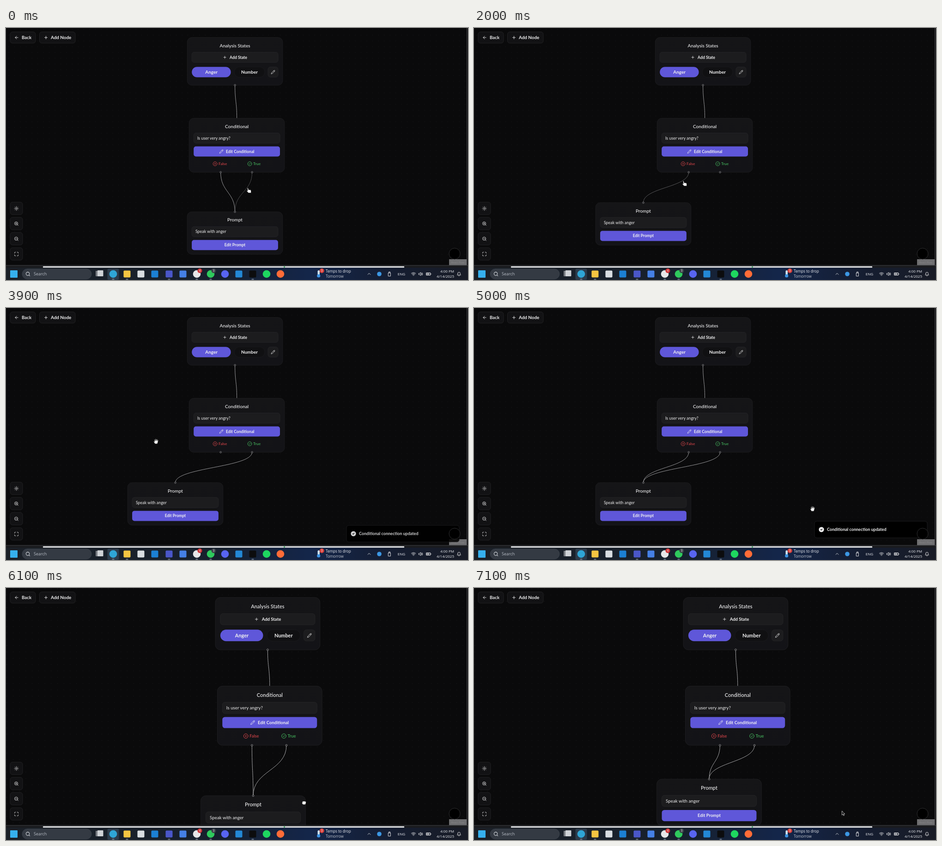
Write an HTML page that moves like this. It is 1000 px wide and 546 px high and loops after 7.2 s.

```html
<!DOCTYPE html>
<html lang="en">
<head>
<meta charset="utf-8">
<title>Flow editor</title>
<style>
  html, body { margin: 0; width: 100%; height: 100%; overflow: hidden; background: #0a0a0b; }
  svg { display: block; width: 100%; height: 100%; }
  text { font-family: Lato, sans-serif; fill: #f1f1f2; white-space: pre; }
  .b { font-weight: 700; }
  .m { font-weight: 500; }
  .mid { text-anchor: middle; }
  .os text { font-family: "Open Sans", "Noto Sans", sans-serif; fill: #eceef2; }
  .icon { fill: none; stroke-linecap: round; stroke-linejoin: round; }
  .edge { fill: none; stroke: #a9a9ab; stroke-width: .9; }
  .card { fill: url(#cardFill); stroke: #202023; stroke-width: .8; }
  .field { fill: #1c1c1e; stroke: #29292b; stroke-width: .7; }
  .btn { fill: #121214; stroke: #272729; stroke-width: .8; }
  .main { fill: #5f57d9; }
  .port { fill: #111113; stroke: #a0a0a2; stroke-width: .8; }
  .hand { fill: #fff; stroke: #111; stroke-width: .7; stroke-linejoin: round; }
</style>
</head>
<body>
<svg id="stage" viewBox="0 0 1000 546" preserveAspectRatio="none"></svg>
<script>
const LOOP = 7200, STEP = 100, ZOOM_AT = 5300;
const VIEW = { k: 1.097, x: 22.7, y: -2 };

const rect = (x, y, w, h, r, cls, extra = '') =>
  `<rect x="${x}" y="${y}" width="${w}" height="${h}" rx="${r}" class="${cls}" ${extra}/>`;
const fillRect = (x, y, w, h, r, color) => rect(x, y, w, h, r, '', `fill="${color}"`);
const dot = (x, y, r, color) => `<circle cx="${x}" cy="${y}" r="${r}" fill="${color}"/>`;
const port = (x, y) => `<circle class="port" cx="${x}" cy="${y}" r="1.7"/>`;
const text = (x, y, size, str, cls = '', extra = '') =>
  `<text x="${x}" y="${y}" dy=".35em" font-size="${size}" class="${cls}" ${extra}>${str}</text>`;

const ICONS = {
  back: 'M19 12H5M12 19l-7-7 7-7',
  plus: 'M5 12h14M12 5v14',
  pencil: 'M21 7a2.8 2.8 0 0 0-4-4L4 16l-2 6 6-2zM15 5l4 4',
  sun: 'M16 12a4 4 0 1 1-8 0a4 4 0 1 1 8 0M12 2v2M12 20v2M5 5l1.4 1.4M17.6 17.6L19 19M2 12h2M20 12h2M6.4 17.6L5 19M19 5l-1.4 1.4',
  lens: 'M19 11a8 8 0 1 1-16 0a8 8 0 1 1 16 0M21 21l-4.3-4.3',
  full: 'M8 3H5a2 2 0 0 0-2 2v3M21 8V5a2 2 0 0 0-2-2h-3M3 16v3a2 2 0 0 0 2 2h3M16 21h3a2 2 0 0 0 2-2v-3',
  ring: 'M22 12a10 10 0 1 1-20 0a10 10 0 1 1 20 0',
  cross: 'M15 9l-6 6M9 9l6 6',
  check: 'M8 12l3 3 5-6',
  up: 'M5 15l7-7 7 7',
  wifi: 'M2 9a15 15 0 0 1 20 0M5 13a10 10 0 0 1 14 0M8.5 16.5a5 5 0 0 1 7 0M12 20h.1',
  sound: 'M11 5L6 9H2v6h4l5 4zM15 9a5 5 0 0 1 0 6M18 6a9 9 0 0 1 0 12',
  battery: 'M2 7h17v10H2zM22 11v2M5 10h8v4H5z',
  bell: 'M6 9a6 6 0 0 1 12 0c0 6 3 8 3 8H3s3-2 3-8M10 21h4',
  device: 'M7 7h10v15H7zM9 7V2h6v5'
};
ICONS.zoomIn = ICONS.lens + 'M11 8v6M8 11h6';
ICONS.zoomOut = ICONS.lens + 'M8 11h6';

const icon = (name, x, y, size = 10, color = '#f1f1f2', weight = 2) =>
  `<path class="icon" d="${ICONS[name]}" stroke="${color}" stroke-width="${weight}"
    transform="translate(${x - size / 2} ${y - size / 2}) scale(${size / 24})"/>`;

// Cards are drawn around their top centre.
const card = (id, x, y, h, title, body) =>
  `<g id="${id}" transform="translate(${x} ${y})">${rect(-103.3, 0, 206.6, h, 10, 'card')}
    ${text(0, 17.6, 10.1, title, 'm mid')}${body}</g>`;
const row = (y, cls) => rect(-93.4, y, 186.8, 22, 5, cls);

const states = card('states', 495.6, 20.5, 103.5, 'Analysis States',
  row(32, 'field') + icon('plus', -22, 43, 9) + text(-11.6, 43, 8.7, 'Add State', 'b') +
  rect(-93.4, 63.7, 84.4, 22.6, 11.3, 'main') + text(-51, 75.2, 9.9, 'Anger', 'b mid') +
  rect(-1.5, 63.7, 66, 22.6, 11.3, '', 'fill="#101012" stroke="#1c1c1f" stroke-width=".8"') +
  text(31.3, 75.2, 9.9, 'Number', 'b mid') +
  rect(71.4, 64, 22, 22, 5, 'field') + icon('pencil', 82.4, 75, 9.5) + port(0, 103.3));

const conditional = card('conditional', 499.6, 195.5, 117, 'Conditional',
  row(32, 'field') + text(-85.6, 43, 8.9, 'Is user very angry?') +
  row(61, 'main') + icon('pencil', -33.5, 72, 9.5) + text(-23.6, 72, 8.6, 'Edit Conditional', 'b') +
  icon('ring', -47, 98.7, 10.5, '#e5484d') + icon('cross', -47, 98.7, 10.5, '#e5484d') +
  text(-39.6, 98.7, 8.4, 'False', '', 'style="fill:#e5484d"') +
  icon('ring', 28, 98.7, 10.5, '#4ac764') + icon('check', 28, 98.7, 10.5, '#4ac764') +
  text(35.4, 98.7, 8.4, 'True', '', 'style="fill:#4ac764"') +
  port(-35, 117) + port(33, 117));

const prompt = card('prompt', 495.5, 398.3, 92, 'Prompt',
  row(32, 'field') + text(-85.6, 43, 8.9, 'Speak with anger') +
  row(61, 'main') + text(0, 72, 8.6, 'Edit Prompt', 'b mid') + port(0, 0));

const edge = id => `<path id="${id}" class="edge"/>`;

const tools = ['sun', 'zoomIn', 'zoomOut', 'full'].map((name, i) =>
  rect(9, 377.3 + i * 32.9, 27, 27, 5, 'btn') + icon(name, 22.5, 391 + i * 32.9, 10.5)).join('');

const header = rect(9, 8.5, 55, 24.3, 5, 'btn') + icon('back', 23, 20.7, 10.5) +
  text(34, 20.7, 9.7, 'Back', 'b') +
  rect(72.5, 8.5, 77.5, 24.3, 5, 'btn') + icon('plus', 86.5, 20.7, 10.5) +
  text(97, 20.7, 9.9, 'Add Node', 'b');

const toast = `<g id="toast">${rect(737, 462, 244, 36, 5, '', 'fill="#000" stroke="#232325" stroke-width=".8"')}
  ${dot(752, 480, 5.6, '#f4f4f5')}${icon('check', 752, 480, 10.5, '#000', 2.6)}
  ${text(764, 480, 9, 'Conditional connection updated', 'b')}</g>`;

// Taskbar apps: x, shape, colour
const APPS = [
  [232, 'o', '#2fa5d5'], [262, 's', '#f5c542'], [292, 's', '#d9dde2'], [322, 's', '#1c80d4'],
  [353, 's', '#4a57c9'], [383, 's', '#4580e6'], [413, 'o', '#e6e6e8'], [443, 'o', '#2fca5d'],
  [474, 'o', '#5865f2'], [504, 's', '#2388d6'], [534, 's', '#0c0c0d'], [564, 'o', '#1ed760'],
  [594, 'o', '#ff6c37']
];
const apps = APPS.map(([x, shape, color]) => shape === 'o'
  ? dot(x, 533, 8.3, color) : fillRect(x - 7.5, 525.5, 15, 15, 2, color)).join('');
const marks = [232, 262, 353, 413, 443, 534].map(x => fillRect(x - 2.5, 543.8, 5, 1.3, .6, '#9aa4b2')).join('');
const badge = (x, color, n) => dot(x, 526, 5, color) + text(x, 526, 6.6, n, 'mid');

const taskbar = `<g class="os">
  ${fillRect(0, 514, 1000, 6, 0, '#1a1b1e')}${fillRect(0, 513.7, 1000, 1.5, 0, '#343538')}
  ${fillRect(80, 516.3, 782, 3.2, 1, '#e9eaec')}${dot(602.5, 517.6, 1.5, '#3fae63')}
  ${fillRect(0, 519.4, 1000, 26.6, 0, 'url(#barFill)')}
  ${fillRect(9, 525, 16, 16, 1, '#35b0ee')}
  ${rect(35, 522, 150, 22, 11, '', 'fill="#343a43" stroke="#434a54" stroke-width=".6"')}
  ${icon('lens', 47.5, 533, 11, '#dfe3e8', 2.2)}${text(60, 533, 9, 'Search', '', 'style="fill:#b9bec6"')}
  ${fillRect(194, 526, 12, 12, 1, '#777b81')}${fillRect(198, 525, 12.5, 13, 1, '#cfd2d6')}
  ${fillRect(219.5, 521.5, 25, 24, 3, '#2c3b4b')}${apps}${marks}
  ${badge(419.5, '#d13438', '4')}${badge(449.5, '#3b4148', '3')}
  ${rect(674.5, 525, 4.5, 11, 2.2, '', 'fill="#cfe3f5"')}${dot(676.7, 537, 3.6, '#3d95e6')}
  ${badge(683.7, '#d9403a', '3')}
  ${text(692, 527.2, 8.1, 'Temps to drop')}${text(692, 538.2, 8.1, 'Tomorrow', '', 'style="fill:#c3c8d0"')}
  ${icon('up', 786, 533, 10)}${dot(808, 533, 4.8, '#3c97e4')}${icon('device', 830, 533, 11)}
  ${text(856, 533, 8, 'ENG', 'mid')}${icon('wifi', 882, 533, 11)}${icon('sound', 898, 533, 11)}
  ${icon('battery', 915, 533, 12)}
  ${text(970, 527, 8, '4:00 PM', '', 'text-anchor="end"')}${text(970, 538, 8, '4/14/2025', '', 'text-anchor="end"')}
  ${icon('bell', 980.5, 533, 10.5)}</g>`;

// Cursor shapes around their visual centre
const HANDS = {
  point: 'M-2.6-5.2q1.3-.8 1.8.6l1 3.2 3-.1q2 .1 2.2 2l.2 4.8h-6l-3.4-4q-.6-1.4.8-1.2l1.2.6z',
  open: 'M-2.6 5.2l-2.7-4.6q0-1.3 1.5-.6l.8.8-1-4.2q.5-1.2 1.5-.2l.9 2.4-.3-3.6q.8-1.3 1.7 0l.4 3.4.7-3q1-1 1.6.2l-.2 3.3.9-2q1.1-.7 1.3.5l-.8 4.4-1.2 3.2z',
  fist: 'M-2.4 4.2l-2-3q-.3-1.5 1-1.4l-.1-2q.8-1.3 2-.5 1-1.1 2.1-.1 1.2-.8 2 .3 1.6-.3 1.7 1l-.2 3-1.2 2.7z',
  arrow: 'M-2.6-5v9l2.1-1.9 1.5 3.2 1.4-.7-1.5-3h2.8z'
};

document.getElementById('stage').innerHTML = `
  <defs>
    <linearGradient id="cardFill" x2="0" y2="1"><stop stop-color="#151517"/><stop offset="1" stop-color="#131317"/></linearGradient>
    <linearGradient id="barFill"><stop stop-color="#1b2027"/><stop offset=".45" stop-color="#17202d"/>
      <stop offset=".66" stop-color="#14264a"/><stop offset=".85" stop-color="#151d30"/><stop offset="1" stop-color="#191c26"/></linearGradient>
    <pattern id="grid" width="12.5" height="12.5" patternUnits="userSpaceOnUse">${dot(6, 3, .5, '#222225')}</pattern>
  </defs>
  ${fillRect(0, 0, 1000, 546, 0, '#0a0a0b')}
  <g id="flow">${fillRect(-40, -20, 1060, 560, 0, 'url(#grid)')}
    ${edge('link')}${edge('no')}${edge('yes')}${edge('draft')}${states}${conditional}${prompt}</g>
  ${fillRect(959, 501, 38, 13, 0, '#6f6f71')}${text(978, 507.5, 6, 'React Flow', 'mid', 'style="fill:#858587"')}
  ${header}${tools}${toast}
  <circle cx="971" cy="489" r="12" fill="#000" stroke="#2e2e30"/>
  ${fillRect(997, 0, 1.6, 514, 0, '#38383b')}${taskbar}
  <path id="cursor" class="hand"/>`;

const el = Object.fromEntries(['flow', 'link', 'no', 'yes', 'draft', 'prompt', 'toast', 'cursor']
  .map(id => [id, document.getElementById(id)]));

// Keys: time, x, y and, for the cursor, its shape from then on
const CURSOR = [
  [0, 525, 352, 'point'], [300, 525, 352, 'open'], [700, 455, 415, 'fist'], [1400, 326, 395, 'open'],
  [1900, 452, 338, 'point'], [2000, 455, 337, 'point'], [2300, 455, 337, 'open'], [2900, 532, 316, 'point'],
  [3000, 532, 316, 'open'], [3200, 492, 341, 'open'], [3600, 368, 383, 'open'], [3700, 368, 383, 'open'],
  [3900, 325, 289, 'open'], [4100, 465, 316, 'open'], [4300, 368, 383, 'open'], [4600, 368, 383, 'open'],
  [5000, 733, 435, 'open'], [5200, 23, 492, 'point'], [5300, 23, 492, 'open'], [5600, 535, 428, 'fist'],
  [6100, 645, 465, 'fist'], [6600, 619, 429, 'open'], [6800, 619, 429, 'arrow'], [7100, 799, 488, 'arrow']
];
const PROMPT = [
  [0, 495.5, 398.3], [700, 495.5, 398.3], [1400, 366.5, 378.4], [5600, 366.5, 378.4],
  [6100, 467, 412], [6600, 443.3, 379.3]
];
const DRAFT_YES = [[3000, 532.6, 312.5], [3100, 528, 315], [3200, 502, 323], [3600, 366.5, 378.4]];
const DRAFT_NO = [[4100, 464.6, 312.5], [4300, 366.5, 378.4]];
const SLIDE = [[3700, 27, 0], [3800, 18, .45], [3900, 9, .85], [4000, 0, 1], [5100, 0, 1], [5400, 27, 0]];

function at(keys, t) {
  const i = keys.findLastIndex(k => k[0] <= t);
  if (i < 0) return keys[0];
  const a = keys[i], b = keys[i + 1];
  if (!b) return a;
  const p = (t - a[0]) / (b[0] - a[0]), e = p * p * (3 - 2 * p);
  return [t, a[1] + (b[1] - a[1]) * e, a[2] + (b[2] - a[2]) * e, a[3]];
}

function curve(path, x, y, tx, ty, opacity) {
  const my = (y + ty) / 2;
  path.setAttribute('d', `M${x} ${y}C${x} ${my} ${tx} ${my} ${tx} ${ty}`);
  path.setAttribute('opacity', opacity);
}

function draw(t) {
  const zoom = t >= ZOOM_AT ? VIEW : { k: 1, x: 0, y: 0 };
  el.flow.setAttribute('transform', `translate(${zoom.x} ${zoom.y}) scale(${zoom.k})`);

  const [, px, py] = at(PROMPT, t);
  el.prompt.setAttribute('transform', `translate(${px} ${py})`);

  const yes = t < 300 ? .45 : t < 3700 ? 0 : 1;
  const no = t < 1900 ? 1 : t < 2300 ? .55 : t < 4300 ? 0 : 1;
  curve(el.link, 495.6, 123.8, 499.6, 195.5, 1);
  curve(el.no, 464.6, 312.5, px, py, no);
  curve(el.yes, 532.6, 312.5, px, py, yes);

  const first = t < 4000, keys = first ? DRAFT_YES : DRAFT_NO;
  const active = first ? t > 3000 && t < 3700 : t > 4100 && t < 4300;
  const [, dx, dy] = at(keys, t);
  curve(el.draft, first ? 532.6 : 464.6, 312.5, dx, dy, active ? 1 : 0);

  const [, drop, alpha] = at(SLIDE, t);
  el.toast.setAttribute('transform', `translate(0 ${drop})`);
  el.toast.setAttribute('opacity', alpha);

  const [, cx, cy, shape] = at(CURSOR, t);
  el.cursor.setAttribute('d', HANDS[shape]);
  el.cursor.setAttribute('transform', `translate(${cx} ${cy})`);
  el.cursor.style.cssText = shape === 'arrow' ? 'fill:#0a0a0b;stroke:#fff' : '';
}

function frame(now) {
  draw(Math.floor((now % LOOP) / STEP) * STEP);
  requestAnimationFrame(frame);
}
draw(0);
requestAnimationFrame(frame);
</script>
</body>
</html>
```
